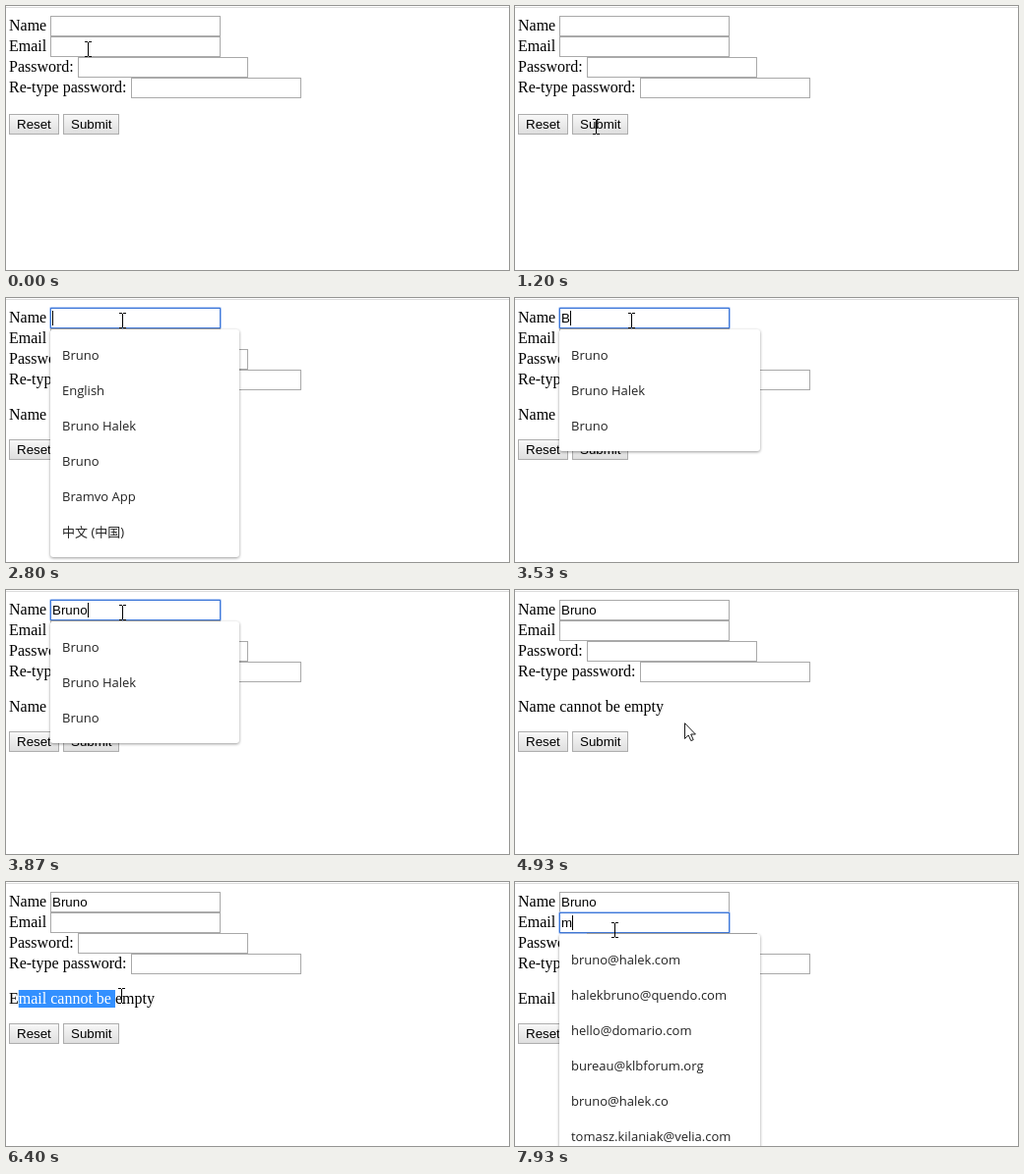
An HTML page that plays this animation: 511x269 px, repeating every 8000 ms.

```html
<!DOCTYPE html>
<html lang="en">
<head>
<meta charset="utf-8">
<title>Form validation</title>
<style>
  html, body { margin: 0; width: 100%; height: 100%; overflow: hidden; background: #fff; }
  svg { display: block; }
  text { white-space: pre; }
  .serif { font: 16px "Liberation Serif", "Times New Roman", serif; }
  .sans { font: 13.333px "Liberation Sans", Arial, sans-serif; }
  .menu { font: 13px "Open Sans", "Noto Sans CJK SC", "Noto Sans CJK", sans-serif; fill: #222; }
  .panel { fill: #fff; filter: drop-shadow(0 1px 1.5px #0006); }
  .field { fill: #fff; stroke: #a9a9a9; }
  .button { fill: url(#face); stroke: #adadad; }
  .button.down { fill: #dcdcdc; stroke: #8c8c8c; }
</style>
</head>
<body>
<svg width="511" height="269">
  <defs>
    <linearGradient id="face" x2="0" y2="1">
      <stop stop-color="#f8f8f8"/><stop offset="1" stop-color="#dedede"/>
    </linearGradient>
  </defs>
  <g id="scene"></g>
</svg>
<script>
const LOOP = 8000, TICKS_PER_MS = 15 / 1000;
const scene = document.getElementById('scene');
const ctx = document.createElement('canvas').getContext('2d');

const NAME = 'Bruno';
const fields = [['Name', 45], ['Email', 45], ['Password:', 73], ['Re-type password:', 127]];
const FIELD_W = 173, ROW = 21;
const names = [NAME, 'English', 'Bruno Halek', NAME, 'Bramvo App', '中文 (中国)'];
const matches = [NAME, 'Bruno Halek', NAME];
const emails = ['bruno@halek.com', 'halekbruno@quendo.com', 'hello@domario.com',
  'bureau@klbforum.org', 'bruno@halek.co', 'tomasz.kilaniak@velia.com'];

// Pointer path: tick, x, y
const path = [
  [0, 83, 44], [2, 66, 25], [3, 66, 25], [7, 52, 96], [10, 82, 122], [17, 82, 122],
  [18, 82, 123], [23, 82, 123], [26, 26, 119], [28, 26, 119], [32, 135, 119], [34, 135, 119],
  [36, 118, 23], [66, 118, 23], [70, 337, 70], [71, 337, 74], [74, 172, 135], [77, 86, 147],
  [78, 82, 147], [80, 82, 148], [83, 82, 148], [86, 11, 128], [87, 11, 128], [90, 14, 119],
  [93, 14, 119], [96, 117, 116], [98, 130, 119], [101, 130, 119], [103, 101, 49], [120, 101, 49]
];
const nameKeys = [52, 54, 55, 57, 58];

function pointer(tick) {
  const i = path.findIndex(p => p[0] > tick);
  const [t0, x0, y0] = path[i - 1], [t1, x1, y1] = path[i];
  const k = (tick - t0) / (t1 - t0);
  return [Math.round(x0 + (x1 - x0) * k), Math.round(y0 + (y1 - y0) * k)];
}

const between = (t, a, b) => t >= a && t < b;
const rect = (x, y, w, h, attrs) => `<rect x="${x}" y="${y}" width="${w}" height="${h}" ${attrs}/>`;
const text = (x, y, cls, s) => `<text x="${x}" y="${y}" class="${cls}">${s}</text>`;

function width(s, font) {
  ctx.font = font;
  return ctx.measureText(s).width;
}
const serifWidth = s => width(s, '16px "Liberation Serif", "Times New Roman", serif');
const sansWidth = s => width(s, '13.333px "Liberation Sans", Arial, sans-serif');

function field([label, x], row, value, focused, caret) {
  const y = 10 + row * ROW;
  let out = text(3, y + 15, 'serif', label) + rect(x + .5, y + .5, FIELD_W - 1, 20, 'class="field"');
  if (focused) {
    out += rect(x - .5, y - .5, FIELD_W + 1, 22, 'rx="1" fill="none" stroke="#a9c4f3"') +
      rect(x + .5, y + .5, FIELD_W - 1, 20, 'fill="none" stroke="#3f78d8"');
  }
  out += text(x + 2, y + 15, 'sans', value);
  if (caret) out += rect(Math.round(x + 2 + sansWidth(value)), y + 3, 1, 15, '');
  return out;
}

function button(x, y, w, label, down) {
  return rect(x + .5, y + .5, w - 1, 20, `class="button ${down ? 'down' : ''}"`) +
    text(x + 8, y + 15, 'sans', label);
}

function message(s, from, endX) {
  if (endX === undefined) return text(3, 124, 'serif', s);
  const edge = n => 3 + serifWidth(s.slice(0, n));
  let to = from;
  while (to < s.length && (edge(to) + edge(to + 1)) / 2 < endX) to++;
  return rect(edge(from), 110, edge(to) - edge(from), 18, 'fill="#3390ff"') +
    text(3, 124, 'serif', s.slice(0, from) +
      `<tspan fill="#fff">${s.slice(from, to)}</tspan>` + s.slice(to));
}

function menu(y, w, items) {
  return rect(45, y, w, items.length * 36 + 16, 'rx="3" class="panel"') +
    items.map((s, i) => text(57, y + 31 + i * 36, 'menu', s)).join('');
}

function cursor(x, y, beam) {
  return beam
    ? `<path transform="translate(${x},${y})" fill="none" stroke="#000" d="M-3-7.5H0M1-7.5H4M.5-7V7M-3 7.5H0M1 7.5H4"/>`
    : `<path transform="translate(${x},${y})" fill="#fff" stroke="#000" stroke-width=".9" d="M.5.7V16.5L4.2 13 6.8 18.6 9.2 17.6 6.7 12H11.4Z"/>`;
}

function overText(x, y, hasMessage) {
  const row = Math.floor((y - 10) / ROW);
  if (fields[row]) return x < fields[row][1] + FIELD_W;
  return hasMessage && between(y, 110, 128) && x < 151;
}

function draw(tick) {
  const [x, y] = pointer(tick);
  const onName = between(tick, 42, 71), onEmail = tick >= 108;
  const typed = NAME.slice(0, nameKeys.filter(k => k <= tick).length);
  const caretOff = between(tick, 50, 52) || between(tick, 66, 71) || between(tick, 116, 119);
  const shown = tick >= 19, buttonY = shown ? 144 : 110;

  let out = rect(0, 1, 511, 1, 'fill="#dcdcdc"');
  out += field(fields[0], 0, typed, onName, onName && !caretOff);
  out += field(fields[1], 1, tick >= 119 ? 'm' : '', onEmail, onEmail && !caretOff);
  out += field(fields[2], 2, '') + field(fields[3], 3, '');

  if (shown) {
    const second = tick >= 80;
    const [start, stop, clear] = second ? [94, 98, 108] : [29, 32, 42];
    const endX = between(tick, start, clear) ? pointer(Math.min(tick, stop))[0] - 4 : undefined;
    out += message((second ? 'Email' : 'Name') + ' cannot be empty', second ? 1 : 2, endX);
  }
  out += button(3, buttonY, 51, 'Reset');
  out += button(58, buttonY, 57, 'Submit', between(tick, 14, 17) || tick === 79);

  if (onName) out += menu(32, between(tick, 53, 55) ? 204 : 192, tick < 53 ? names : matches);
  if (onEmail) out += menu(53, 204, emails);

  const overMenu = onName && y > 32 && x < 237;
  scene.innerHTML = out + cursor(x, y, !overMenu && overText(x, y, tick >= 18));
}

let last = -1;
function frame() {
  // Small lead absorbs the rounding of tick times to whole hundredths
  const tick = Math.floor((performance.now() % LOOP + 4) * TICKS_PER_MS) % 120;
  if (tick !== last) draw(last = tick);
  requestAnimationFrame(frame);
}
frame();
</script>
</body>
</html>
```
